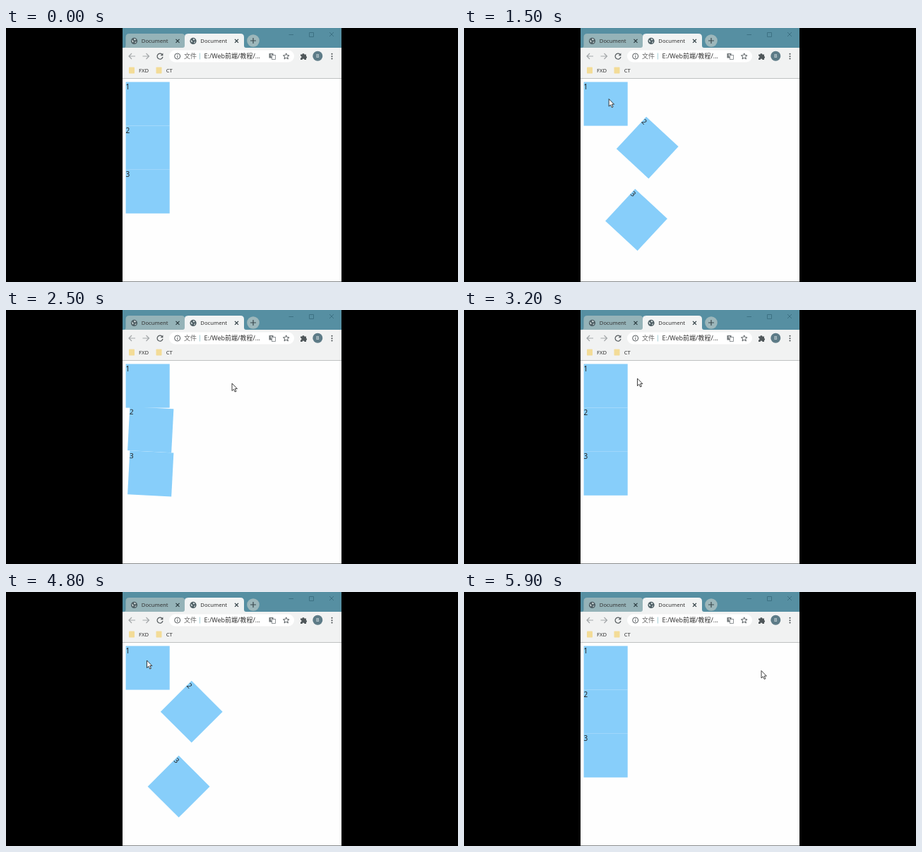
An HTML page for the animation above (6000 ms loop, 640 px wide and 360 px high).

```html
<!DOCTYPE html>
<html lang="zh">
<head>
<meta charset="utf-8">
<title>Transform order</title>
<style>
  html, body { margin: 0; width: 100%; height: 100%; overflow: hidden; background: #000; }
  svg { display: block; width: 640px; height: 360px; }
  text { font: 7.7px "Noto Sans", "Noto Sans CJK SC", "Noto Sans CJK", sans-serif; fill: #333; }
  .path { font-size: 9px; }
  .box rect { fill: #87cefa; }
  .box text { font-size: 10px; fill: #222; }
  .line { fill: none; stroke: #555b5e; stroke-width: 1.2; }
</style>
</head>
<body>
<svg viewBox="0 0 640 360">
  <defs>
    <path id="tab" d="M-3 20Q0 20 0 17V5Q0 0 5 0H79Q84 0 84 5V17Q84 20 87 20Z"/>
    <g id="tabLabel">
      <circle cx="12" cy="10.4" r="4.6" fill="#4d5d63"/>
      <path d="M8.6 8.6L11 10.4 10.6 12.6 9.4 12ZM11.8 6.8L14.6 8 13.6 9.6 11.8 9ZM13 11.4H15.4L13.2 13.8Z" fill="#d8e2e2"/>
      <text x="22.3" y="13.2">Document</text>
      <path d="M71 7.8L76 12.8M76 7.8L71 12.8" class="line" style="stroke:#28383d"/>
    </g>
    <path id="folder" d="M0 .8Q0 0 .8 0H7.2Q8 0 8 .8V8.2Q8 9 7.2 9H.8Q0 9 0 8.2Z" fill="#f3dc97"/>
  </defs>

  <rect x="165" width="310" height="360" fill="#fefefe"/>
  <rect x="165" width="310" height="28.5" fill="#568fa2"/>
  <rect x="165" y="28" width="310" height="43" fill="#f1f2f2"/>
  <path d="M165 71.5H475" stroke="#bfc1c1"/>
  <path d="M165 359.5H475" stroke="#8a8d8e"/>

  <use href="#tab" x="169.5" y="8" fill="#95b3b8"/>
  <use href="#tab" x="253" y="8" fill="#f1f3f3"/>
  <use href="#tabLabel" x="169.5" y="8"/>
  <use href="#tabLabel" x="253" y="8"/>
  <circle cx="350" cy="18" r="8.8" fill="#9db7bb"/>
  <path d="M346 18H354M350 14V22" class="line" style="stroke:#3a494e"/>
  <path d="M400.5 9.5H407M429.5 6.5H435.5V12.5H429.5ZM458 6L464 12M464 6L458 12" fill="none" stroke="#386a7b" stroke-width=".8"/>

  <path d="M183 40H174M178 36L174 40 178 44M193.500 40H202.500M198.500 36L202.500 40 198.500 44" class="line" style="stroke:#a3a7a9"/>
  <path d="M221 37.400A4 4 0 1 0 222 41" class="line"/>
  <path d="M222.400 35.500V39.200H218.600Z" fill="#555b5e"/>

  <rect x="231" y="31.500" width="177" height="17" rx="8.500" fill="#fff"/>
  <circle cx="242.700" cy="40" r="4" class="line" style="stroke-width:1"/>
  <path d="M242.700 39.500V42.300M242.700 37.500V38.600" class="line" style="stroke-width:1"/>
  <text x="252" y="43.200" class="path" style="fill:#666">文件</text>
  <path d="M274.500 35.500V44.500" stroke="#a8d0d6"/>
  <text x="280.500" y="43.200" class="path">E:/Web前端/教程/...</text>

  <rect x="372.500" y="36" width="6" height="6.500" fill="#6d7376"/>
  <rect x="376.500" y="38.500" width="5" height="6" fill="#fff" stroke="#777d80" stroke-width=".8"/>
  <path d="M374 38H377M375.500 37V41" stroke="#fff" stroke-width=".7"/>
  <path d="M396.700 35.800L397.900 38.700 401 38.900 398.600 40.900 399.400 44 396.700 42.300 394 44 394.800 40.900 392.400 38.900 395.500 38.700Z" class="line" style="stroke-width:1"/>
  <path d="M417 37.500H419.300A1.600 1.600 0 0 1 422.500 37.500H425V40A1.600 1.600 0 0 1 425 43V45H422.500A1.500 1.500 0 0 0 419.500 45H417V42.600A1.500 1.500 0 0 0 417 39.600Z" fill="#50575a"/>
  <circle cx="441.300" cy="39.800" r="7" fill="#5d7b87"/>
  <text x="441.300" y="42.300" text-anchor="middle" style="font-size:7px;fill:#e8f0f2">B</text>
  <path d="M461.500 36.800h.01M461.500 40.200h.01M461.500 43.600h.01" stroke="#454b4e" stroke-width="2" stroke-linecap="round"/>

  <use href="#folder" x="174" y="55.500"/>
  <text x="188" y="63">FXD</text>
  <use href="#folder" x="212.500" y="55.500"/>
  <text x="226.700" y="63">CT</text>

  <g id="boxes"></g>
  <path id="cursor" d="M0 0V10.500L2.400 8.300 4.200 12 5.900 11.300 4.200 7.600H7.400Z" fill="#fff" stroke="#111" stroke-width=".8"/>
</svg>
<script>
const LOOP = 6000, STEP = 100, SIZE = 62.1, LEFT = 169.6, TOP = 76.5;
const TRANSITION = 1000;
const hovers = [[775, 1815], [3210, 4860]];
// time, x, y of the pointer tip
const pointer = [
  [100, 330, 118], [600, 246, 105], [775, 231, 103], [1000, 218.5, 102], [1300, 204, 100],
  [1650, 206, 101], [1815, 232, 103], [2000, 303, 105], [2300, 330, 106], [2700, 310, 102],
  [3200, 245.500, 97], [3450, 199.500, 97], [4800, 199.500, 97], [4860, 232, 99],
  [5300, 380, 109], [5600, 421, 111.500], [6000, 421, 111.500]
];

const boxes = [1, 2, 3].map(n => {
  const g = document.createElementNS("http://www.w3.org/2000/svg", "g");
  g.setAttribute("class", "box");
  const h = SIZE / 2;
  g.innerHTML = `<rect x="${-h}" y="${-h}" width="${SIZE}" height="${SIZE}"/><text x="${-h}" y="${10.6 - h}">${n}</text>`;
  document.getElementById("boxes").append(g);
  return g;
});
const cursor = document.getElementById("cursor");

// CSS "ease": cubic-bezier(.25, .1, .25, 1)
function ease(x) {
  if (x <= 0) return 0;
  if (x >= 1) return 1;
  const bezier = (u, a, b) => 3 * u * (1 - u) ** 2 * a + 3 * u * u * (1 - u) * b + u ** 3;
  let lo = 0, hi = 1;
  for (let i = 0; i < 24; i++) {
    const mid = (lo + hi) / 2;
    if (bezier(mid, .25, .25) < x) lo = mid; else hi = mid;
  }
  return bezier(lo, .1, 1);
}

function pointerAt(t) {
  const i = Math.max(1, pointer.findIndex(k => k[0] >= t));
  const [t0, x0, y0] = pointer[i - 1], [t1, x1, y1] = pointer[i];
  const f = (t - t0) / (t1 - t0);
  return [x0 + (x1 - x0) * f, y0 + (y1 - y0) * f];
}

function draw(t) {
  const p = hovers.reduce((sum, [enter, leave]) =>
    sum + ease((t - enter) / TRANSITION) - ease((t - leave) / TRANSITION), 0);
  const move = `translate(${SIZE * p} 0)`, turn = `rotate(${45 * p})`;
  ["", move + turn, turn + move].forEach((transform, i) => {
    const home = `translate(${LEFT + SIZE / 2} ${TOP + SIZE * (i + .5)})`;
    boxes[i].setAttribute("transform", home + transform);
  });
  cursor.style.display = t < pointer[0][0] ? "none" : "";
  cursor.setAttribute("transform", `translate(${pointerAt(t)})`);
}

const start = performance.now();
function tick() {
  const t = (performance.now() - start) % LOOP;
  draw(Math.floor(t / STEP) * STEP);
  requestAnimationFrame(tick);
}
tick();
</script>
</body>
</html>
```
